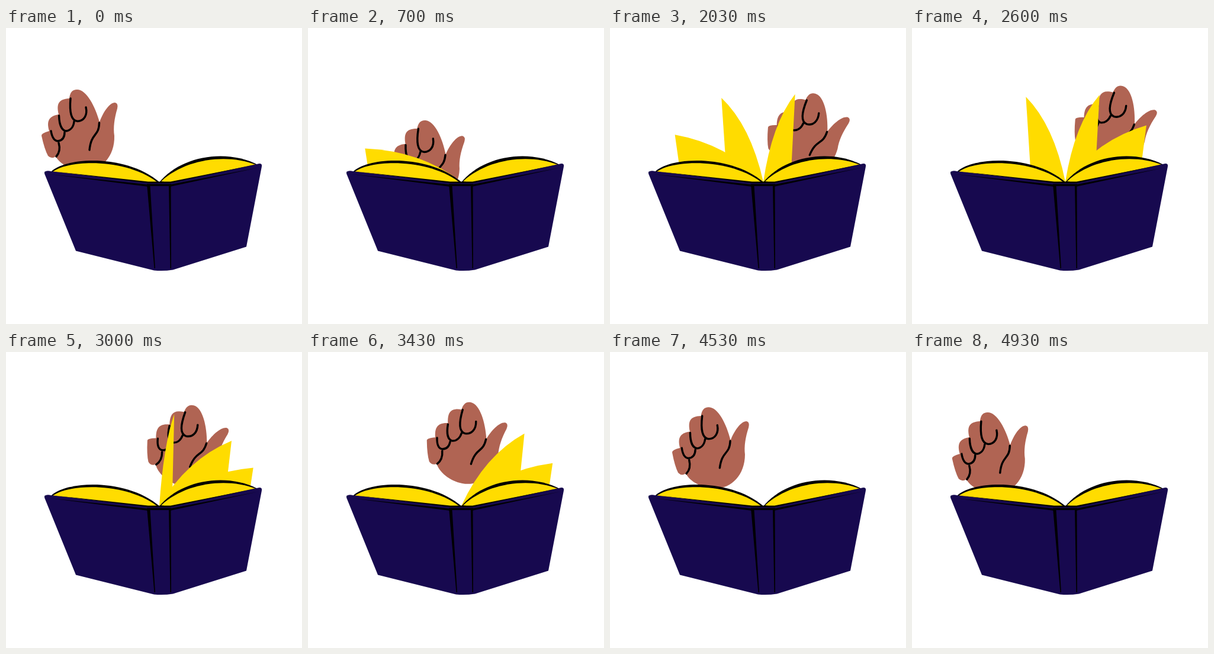
These frames come from a looping animation (500 by 500 pixels, 5.01 s). An HTML page:

```html
<!DOCTYPE html>
<html lang="en">
<head>
<meta charset="utf-8">
<title>Turning pages</title>
<style>
html, body { margin: 0; width: 100%; height: 100%; overflow: hidden; background: #fff; }
svg { display: block; width: 100%; height: 100%; }
.line { fill: none; stroke: #000; stroke-width: 3.4; stroke-linecap: round; stroke-linejoin: round; }
.paper { fill: #ffdc00; }
.cover { fill: #17094f; }
</style>
</head>
<body>
<svg viewBox="0 0 500 500">
  <g id="hand">
    <path fill="#b06453" d="M61 182Q60 178 74 174C70 160 71 149 90 146C86 129 89 120 108 119
      C109 109 113 104 121 104C137 104 152 133 159 159C165 142 176 126 185 126Q191 127 189 136
      C184 153 182 168 184 182C185 217 162 241 134 241C112 241 92 230 85 217Q78 222 72 216Q66 205 61 182Z"/>
    <g class="line">
      <path d="M110 119C108 142 111 157 122 157.500C133 157 139 147 136 134"/>
      <path d="M90.500 148C91 165 96 173.500 103 174C110 173 115 167 116 158"/>
      <path d="M77 174C79 186 83 191 89 191C96 190 100 185 100 176"/>
      <path d="M90 194Q94 208 86 217"/>
      <path d="M158.500 160C158 184 145 176 142 206"/>
    </g>
  </g>
  <g id="pages" class="paper"></g>
  <g id="book">
    <path d="M76 243C100 218 203 212 260 261L240 265Z"/>
    <path class="paper" d="M79 243C105 223 200 219 255 260L240 263Z"/>
    <path d="M258 262C294 216 373 203 427 232L278 265Z"/>
    <path class="paper" d="M262 259C303 221 373 212 422 231L278 262Z"/>
    <path class="cover" d="M65 243Q69 240 76 242L240 261H278L428 229Q433 229 432 234L406 369.500L282 408.500Q266 411 250 409.500L118 376.500L65 246Z"/>
    <path d="M78 242L240 259.500H278L424 230.500L278 262H240Z"/>
    <path d="M74 247L240 264.500V268Z"/>
    <path d="M277 264.500L426 236L277 268Z"/>
    <path d="M238 263.500H279V267H243.500L252 406H250.500Z"/>
    <path d="M275 265H278.500L279 406H277.500Z"/>
  </g>
</svg>
<script>
const LOOP = 5010;
const HAND_PEAK = 2340;
const PAGE_COUNT = 3;
const TURN_GAP = 550;
const SPINE = { x: 259, y: 260 };
const { PI, sin, cos, tanh, abs, min, max, floor } = Math;

const hand = document.getElementById("hand");
const pages = Array.from({ length: PAGE_COUNT }, () => {
  const path = document.createElementNS("http://www.w3.org/2000/svg", "path");
  return document.getElementById("pages").appendChild(path);
});

// Steady swing right and back: low on the way out, high on the return.
function handPose(t) {
  const out = t < HAND_PEAK;
  const w = out ? t / HAND_PEAK : (LOOP - t) / (LOOP - HAND_PEAK);
  const rise = out
    ? 45.5 * (sin(PI * w) + 0.35 * sin(2 * PI * w))
    : -20 * sin(PI * w);
  return { x: 119 + 262 * w, y: 104 + rise, turn: 18 * w * w * (3 - 2 * w) };
}

// A page corner sweeps around the spine, easing at both ends.
function pagePath(t) {
  const deg = 85.5 + 84 * tanh((t - 1740) / 970);
  if (abs(deg - 88) > 76) return "";
  const a = deg * PI / 180;
  const r = 157 + 18 * abs(cos(a)) ** 3;
  const x = SPINE.x - r * cos(a);
  const y = SPINE.y - r * sin(a);
  const lean = SPINE.x - x;
  const bend = 14 * max(-1, min(1, lean / 60));
  const cx = (x + SPINE.x) / 2 + bend;
  const cy = (y + SPINE.y) / 2 - 24;
  const footY = 255;
  const footX = x + 0.00095 * lean * (footY - y);
  return `M${SPINE.x} ${SPINE.y}Q${cx} ${cy} ${x} ${y}L${footX} ${footY}Z`;
}

// Two poses per tenth of a second.
function stepTime(t) {
  const base = floor(t / 100) * 100;
  return min(base + (t - base >= 30 ? 30 : 0), 4930);
}

function draw(t) {
  const { x, y, turn } = handPose(t);
  hand.setAttribute("transform", `translate(${x} ${y}) rotate(${turn}) translate(-120 -104)`);
  pages.forEach((page, i) => page.setAttribute("d", pagePath(t - i * TURN_GAP)));
}

const start = performance.now();
function tick() {
  draw(stepTime((performance.now() - start) % LOOP));
  requestAnimationFrame(tick);
}
tick();
</script>
</body>
</html>
```
